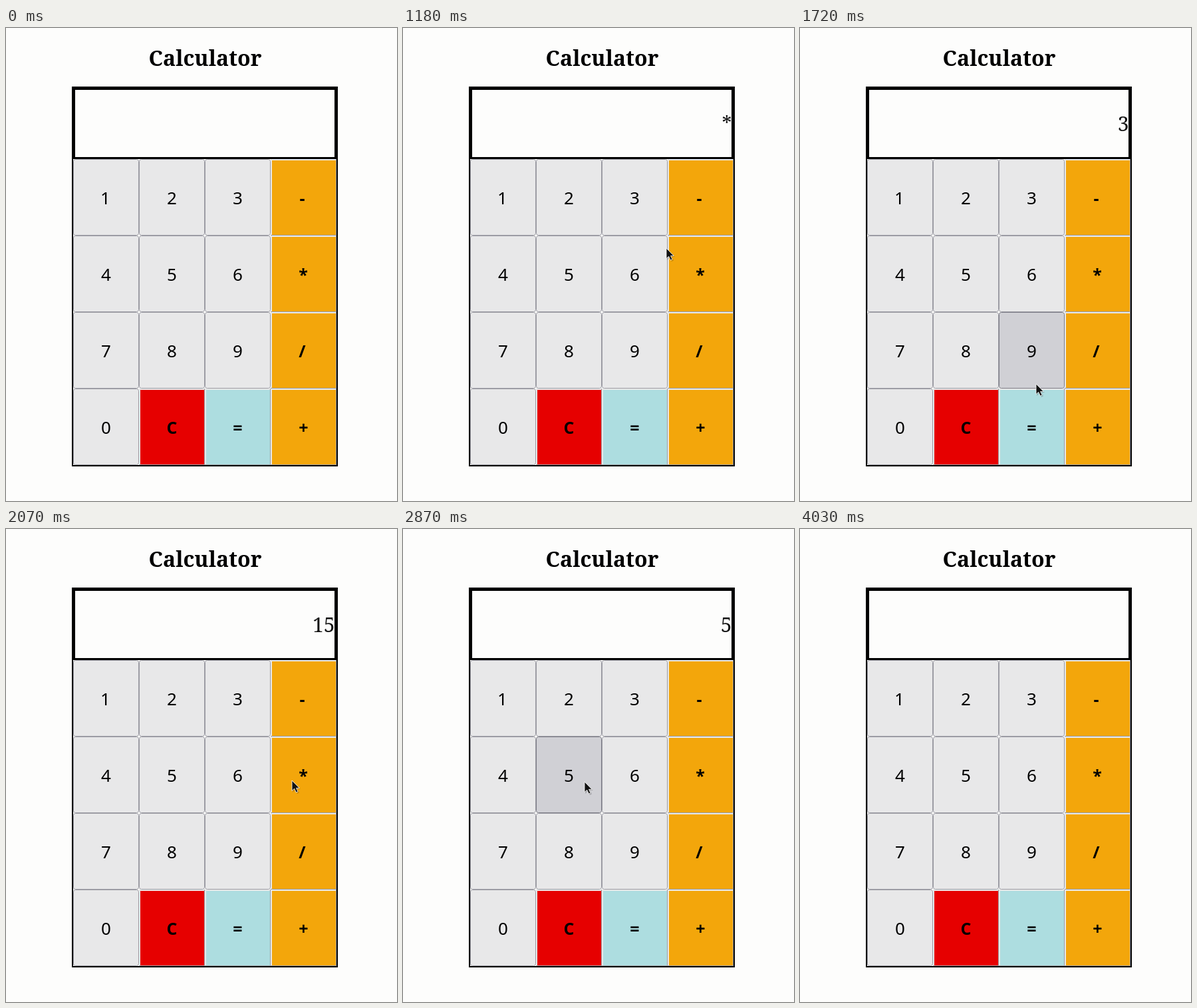
Recreate the animation shown at these times as an HTML page. Size 588 by 711 pixels, loop 4470 ms.

```html
<!DOCTYPE html>
<html lang="en">
<head>
<meta charset="utf-8">
<title>Calculator</title>
<style>
  html, body { margin: 0; width: 100%; height: 100%; overflow: hidden; background: #fdfdfc; }
  svg { display: block; width: 588px; height: 711px; }
  text { text-anchor: middle; fill: #000; }
  .title { font: bold 32px "Noto Serif", serif; }
  .display { font: 30px "Noto Serif", serif; text-anchor: end; fill: #111; }
  .label { font: 26px "Noto Sans", sans-serif; }
  .bold { font-weight: bold; font-size: 25px; }
  .digit { fill: #e8e8e9; stroke: #9c9ca4; }
  .digit.hover { fill: #d0d0d5; stroke: #7c7c86; }
</style>
</head>
<body>
<svg viewBox="0 0 588 711">
  <text class="title" x="299.5" y="57">Calculator</text>
  <path d="M99 88H499V659H99Z"/>
  <path fill="#fdfdfc" d="M104 93H494V194H104Z M101 197H497V657H101Z"/>
  <text class="display" id="display" x="494.5" y="155"></text>
  <g id="keys"></g>
  <g id="cursor">
    <path d="M1 2V18L5 14L8 20L11 18.5L8.5 13H13Z" opacity=".18"/>
    <path d="M0 0V15.5L3.7 12.3L6.3 18L9 16.8L6.5 11.4H11.2Z" fill="#111" stroke="#fff" stroke-width=".8"/>
  </g>
</svg>
<script>
const LOOP = 4470;
const LEFT = 101, TOP = 197, KEY_W = 99, KEY_H = 115;
const LAYOUT = ["123-", "456*", "789/", "0C=+"];
const NUDGE = { "1": -1, "-": -2, "*": -0.5, "/": -2 };
const FILL = { "C": "#e60000", "=": "#addde0" };
const LIGHT = "#e8e8e8", DARK = "#9c9ca0", ORANGE = "#f3a60b";

// Pointer stops: time, x, y and, where a key is pressed, the new reading
const STOPS = [
  [210, 205, 708],
  [640, 266, 364, "5"],
  [680, 267, 360],
  [1000, 440, 350, "*"],
  [1180, 396, 331],
  [1400, 348, 277, "3"],
  [1720, 355, 534],
  [1840, 355, 590, "15"],
  [2070, 430, 378],
  [2400, 438, 372, "*"],
  [2760, 280, 378, "5"],
  [2870, 273, 380],
  [3340, 318, 600, "75"],
  [3520, 259, 596],
  [3710, 259, 596, ""],
  [3960, 259, 596],
  [4020, 525, 68]
];

const keysRoot = document.getElementById("keys");
const display = document.getElementById("display");
const cursor = document.getElementById("cursor");

function add(tag, attrs, content = "") {
  const node = document.createElementNS("http://www.w3.org/2000/svg", tag);
  for (const name in attrs) node.setAttribute(name, attrs[name]);
  node.textContent = content;
  return keysRoot.appendChild(node);
}

function box(fill, x, y, width, height) {
  add("rect", { fill, x, y, width, height });
}

function makeKey(char, col, row) {
  const x = LEFT + col * KEY_W, y = TOP + row * KEY_H;
  const isDigit = /\d/.test(char);
  let face = null;
  if (isDigit) {
    face = add("rect", {
      class: "digit", x: x + 0.5, y: y + 0.5, width: KEY_W - 1, height: KEY_H - 1, rx: 3
    });
  } else {
    box(DARK, x, y, KEY_W, KEY_H);
    box(LIGHT, x, y, KEY_W - 1, KEY_H - 1);
    box(FILL[char] || ORANGE, x + 2, y + 2, KEY_W - 3, KEY_H - 3);
  }
  add("text", {
    class: isDigit ? "label" : "label bold",
    x: x + KEY_W / 2 + (NUDGE[char] || 0), y: y + 68
  }, char);
  return face;
}

const faces = LAYOUT.map((line, row) => [...line].map((char, col) => makeKey(char, col, row)));

function slope(i, axis) {
  const a = STOPS[i], b = STOPS[i + 1];
  return a && b ? (b[axis] - a[axis]) / (b[0] - a[0]) : 0;
}

// Smooth tangent that never overshoots a stop
function tangent(i, axis) {
  const a = slope(i - 1, axis), b = slope(i, axis);
  return a * b > 0 ? 2 * a * b / (a + b) : 0;
}

function pointer(t) {
  const i = STOPS.findLastIndex(stop => stop[0] <= t);
  const a = STOPS[i], b = STOPS[i + 1];
  if (!a || !b) return null;
  const span = b[0] - a[0], u = (t - a[0]) / span;
  return [1, 2].map(axis =>
    a[axis] + (b[axis] - a[axis]) * u * u * (3 - 2 * u) +
    span * u * (1 - u) * (tangent(i, axis) * (1 - u) - tangent(i + 1, axis) * u));
}

function draw(t) {
  const tip = pointer(t);
  cursor.style.display = tip ? "" : "none";
  if (tip) cursor.setAttribute("transform", `translate(${tip.map(Math.round)})`);

  // Hover follows the pointer slightly late
  const late = tip && pointer(t - 20);
  const col = late ? Math.floor((late[0] - LEFT) / KEY_W) : -1;
  const row = late ? Math.floor((late[1] - TOP) / KEY_H) : -1;
  faces.forEach((line, r) => line.forEach((face, c) => {
    if (face) face.classList.toggle("hover", r === row && c === col);
  }));

  const press = STOPS.findLast(stop => stop[0] <= t && stop.length > 3);
  display.textContent = press ? press[3] : "";
}

const start = performance.now();
function tick() {
  draw((performance.now() - start) % LOOP);
  requestAnimationFrame(tick);
}
tick();
</script>
</body>
</html>
```
